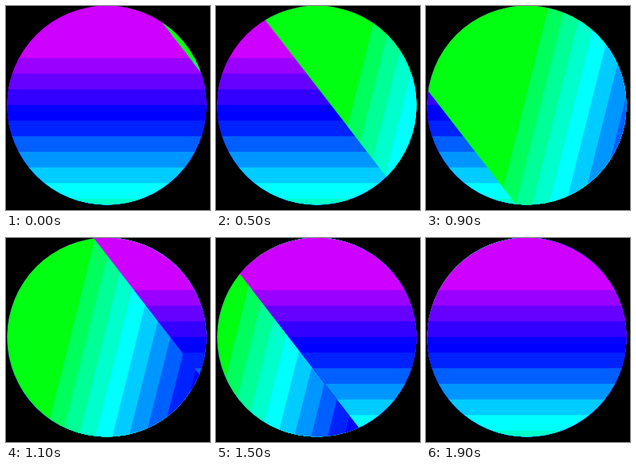
These frames come from a looping animation (256x256 px, 2000 ms). An HTML page with a canvas:

```html
<!DOCTYPE html>
<html>
<head>
<meta charset="utf-8">
<style>
  html, body { margin: 0; height: 100%; overflow: hidden; background: #000; }
  canvas { display: block; }
</style>
</head>
<body>
<canvas width="256" height="256"></canvas>
<script>
const ctx = document.querySelector('canvas').getContext('2d');
const SLOPE = 1.29;
const violetToGreen = ['#ce00ff', '#9900ff', '#6600ff', '#3300ff', '#0000ff', '#0022ff',
  '#0060ff', '#0096ff', '#00ccff', '#00ffff', '#00ffcc', '#00ff96', '#00ff5d', '#00ff11'];
const greenToViolet = [...violetToGreen].reverse();

// [step, value] pairs
const firstEdge = [[0, 180], [4, 48], [8, -80], [10, -145]];
const secondEdge = [[8, 200], [10, 110], [12, 48], [14, -5], [18, -132]];
const greenLimit = [[0, 221], [4, 172], [8, 123], [10, 81], [14, 25], [18, -31]];

function valueAt(points, step) {
  if (step <= points[0][0]) return points[0][1];
  for (let i = 1; i < points.length; i++) {
    const [a, from] = points[i - 1], [b, to] = points[i];
    if (step <= b) return from + (to - from) * (step - a) / (b - a);
  }
  return points[points.length - 1][1];
}

// Colour bands along the rotated x axis; the first colour fills everything before the origin.
function bands(colors, x, y, angle, width) {
  ctx.save();
  ctx.translate(x, y);
  ctx.rotate(angle);
  colors.forEach((color, i) => {
    ctx.fillStyle = color;
    ctx.fillRect(i ? (i - 1) * width : -600, -600, 1200, 1200);
  });
  ctx.restore();
}

const level = () => bands(violetToGreen, 0, 65.4, Math.PI / 2, 19.6);
const tilted = x => bands(greenToViolet, x, 124, Math.atan(0.25), 20.3);

// Draws a layer only to the right of the slanted edge that meets the top at x.
function rightOf(x, draw) {
  ctx.save();
  ctx.beginPath();
  ctx.moveTo(x, 0);
  ctx.lineTo(x + 256 / SLOPE, 256);
  ctx.lineTo(800, 256);
  ctx.lineTo(800, 0);
  ctx.clip();
  draw();
  ctx.restore();
}

function render(step) {
  ctx.fillStyle = '#000';
  ctx.fillRect(0, 0, 256, 256);
  ctx.save();
  ctx.beginPath();
  ctx.arc(126.5, 124.5, 125, 0, 2 * Math.PI);
  ctx.clip();
  level();
  rightOf(valueAt(firstEdge, step), () => tilted(valueAt(greenLimit, step)));
  rightOf(valueAt(secondEdge, step), level);
  ctx.restore();
}

function tick() {
  const time = performance.now() % 2000;
  render(Math.max(0, Math.floor(time / 100) - 1));
  requestAnimationFrame(tick);
}
tick();
</script>
</body>
</html>
```
